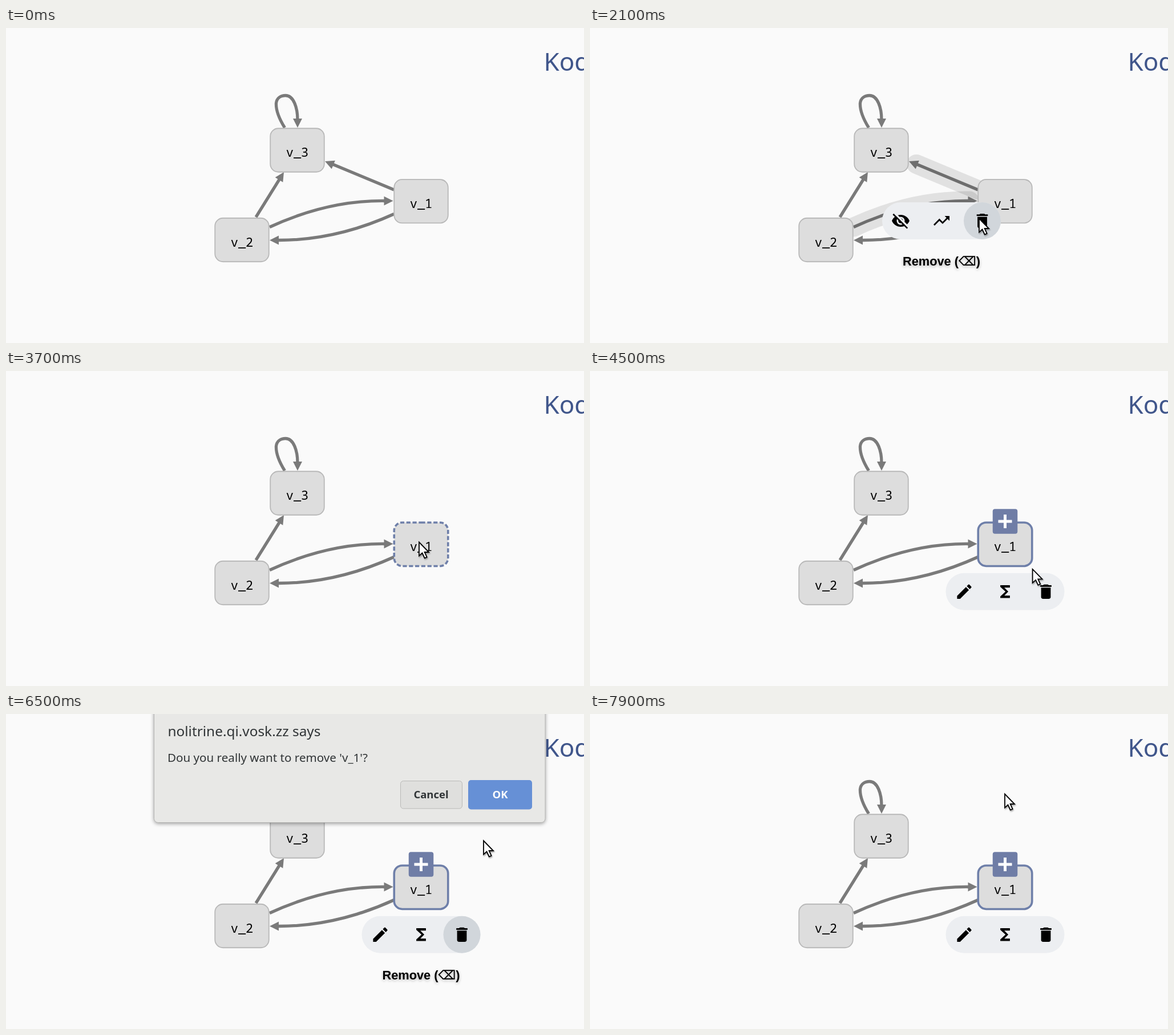
An HTML page that plays this animation: 1013x553 px, repeating every 8 s.

```html
<!DOCTYPE html>
<html lang="en">
<head>
<meta charset="utf-8">
<title>Graph editor</title>
<style>
  html, body { margin: 0; width: 100%; height: 100%; overflow: hidden; background: #fafafa; }
  svg { position: absolute; left: 0; top: 0; width: 1013px; height: 553px; overflow: hidden; }
  text { font-family: "Noto Sans", sans-serif; }
  .edge { fill: none; stroke: #7a7a7a; stroke-width: 5.3; }
  .head { fill: #7a7a7a; }
  .band { fill: none; stroke: #000; stroke-opacity: .1; stroke-width: 34; stroke-linecap: round; }
  .node path { fill: #ddd; stroke: #b8b8b8; stroke-width: 1.8; }
  .node text { font: 22px "Noto Sans Mono", monospace; text-anchor: middle; }
  #v_1.hover path { stroke: #6e7fa9; stroke-width: 3.6; stroke-dasharray: 7.2 3.6; }
  #v_1.selected path { stroke: #6e7fa9; stroke-width: 3.6; }
  .tip { font: bold 21.8px "Liberation Sans", "DejaVu Sans", sans-serif; text-anchor: middle;
         text-shadow: 0 2px 5px rgba(0, 0, 0, .3); }
  #dialog { transform-origin: 602px 0; }
  #dialog text { fill: #303436; }
  #dialog .label { font-size: 18.5px; font-weight: 600; text-anchor: middle; }
  #panel { filter: drop-shadow(0 2px 3px rgba(0, 0, 0, .35)); }
  #cursor { filter: drop-shadow(1px 2px 1px rgba(0, 0, 0, .35)); }
</style>
</head>
<body>
<svg id="graph">
  <text x="942.5" y="75" font-size="44" fill="#40568b">Kodra</text>
  <g id="edges"></g>
  <g id="nodes"></g>
  <g id="plus">
    <rect x="705.75" y="242.25" width="43.5" height="43.5" rx="4" fill="#6f7da6"/>
    <path d="M715.5 264h24M727.5 252v24" stroke="#fff" stroke-width="5"/>
  </g>
  <g id="menus"></g>
</svg>

<svg id="dialog">
  <g id="panel">
    <rect x="259.5" y="-40" width="685.5" height="230.5" rx="7" fill="#e8e8e6" stroke="#b4b4b2"/>
  </g>
  <text x="283.5" y="39" font-size="24.4">nolitrine.qi.vosk.zz says</text>
  <text x="283" y="83.5" font-size="20.6">Dou you really want to remove 'v_1'?</text>
  <rect x="691.5" y="117.5" width="108" height="48.5" rx="5" fill="#dfdfdd" stroke="#b9b9b7"/>
  <text class="label" x="745" y="148">Cancel</text>
  <rect id="ok" x="810" y="116" width="112" height="51.5" rx="5"/>
  <text class="label" x="866" y="148" style="fill:#fff">OK</text>
</svg>

<svg>
  <g id="cursor">
    <path d="M1 1.5V25.5L6.5 20.5L10.7 29.5L14.6 27.7L10.6 19H18Z" fill="#fff" stroke="#000" stroke-width="1.8"/>
  </g>
</svg>

<script>
const $ = id => document.getElementById(id);
const LOOP = 8000, STEP = 100;

// Edge line, then arrow tip and direction in degrees.
const edges = [
  ['loop', 'M488.5 175C478 158 473 143 473.5 132C474.5 123 481.5 118.5 490 118.5C504 118.5 511 140 511 161', 511, 175, 90],
  ['up', 'M438 332L479 266', 487, 253, -58],
  ['back', 'M680 326.5Q578 373 477 372.5', 462, 372.5, 180],
  ['removed', 'M680 284L572 239', 559, 234, 202.5],
  ['forth', 'M462 349.5Q565 302 665 303.5', 678.5, 303.5, 0]
];
$('edges').innerHTML = edges.map(([id, d, x, y, angle]) => `<g id="${id}">
  <path class="edge" d="${d}"/>
  <path class="head" d="M0 0L-16 -8V8Z" transform="translate(${x} ${y}) rotate(${angle})"/>
  <path class="band" id="${id}Band" d="${d}" visibility="hidden"/></g>`).join('');

// The outline starts at the top centre, so dashes run clockwise from there.
const outline = 'M0-38.25H33.25a14 14 0 0 1 14 14V24.25a14 14 0 0 1-14 14H-33.25' +
                'a14 14 0 0 1-14-14V-24.25a14 14 0 0 1 14-14Z';
const nodes = [['v_3', 510.5, 214.5], ['v_2', 413.5, 372], ['v_1', 727.5, 304.2]];
$('nodes').innerHTML = nodes.map(([name, x, y]) => `<g id="${name}" class="node" transform="translate(${x} ${y})">
  <path d="${outline}"/><text y="11.5">${name}</text></g>`).join('');

const icons = {
  hide: `<path d="M1 12c1.73-4.39 6-7.5 11-7.5s9.27 3.11 11 7.5c-1.73 4.39-6 7.5-11 7.5S2.73 16.39 1 12z"/>
    <circle cx="12" cy="12" r="5" fill="#eceef1"/><circle cx="12" cy="12" r="3"/>
    <path d="M3.5 1.8L21.3 19.6" stroke="#eceef1" stroke-width="2.6"/>
    <path d="M2.6 3.6L20.4 21.4" stroke="#000" stroke-width="1.8"/>`,
  trend: '<path d="M16 6l2.29 2.29-4.88 4.88-4-4L2 16.59 3.41 18l6-6 4 4 6.3-6.29L22 12V6z"/>',
  edit: `<path d="M3 17.25V21h3.75L17.81 9.94l-3.75-3.75zM20.71 7.04c.39-.39.39-1.02 0-1.41l-2.34-2.34
    c-.39-.39-1.02-.39-1.41 0l-1.83 1.83 3.75 3.75z"/>`,
  sum: '<path d="M18 4H6v2l6.5 6L6 18v2h12v-3h-7l5-5-5-5h7z"/>',
  trash: '<path d="M6 19c0 1.1.9 2 2 2h8c1.1 0 2-.9 2-2V7H6zM19 4h-3.5l-1-1h-5l-1 1H5v2h14z"/>'
};
const menu = (id, x, y, names) => `<g id="${id}" transform="translate(${x} ${y})">
  <rect x="-104" y="-32.5" width="208" height="65" rx="32.5" fill="#eceef1"/>
  <circle id="${id}Hover" cx="71.5" r="32.5" fill="#d1d6db"/>
  ${names.map((name, i) => `<g transform="translate(${(i - 1) * 71.5} 0) scale(1.4) translate(-12 -12)">${icons[name]}</g>`).join('')}
  <text id="${id}Tip" class="tip" y="78.5">Remove (⌫)</text></g>`;
$('menus').innerHTML = menu('edgeMenu', 616, 338.5, ['hide', 'trend', 'trash'])
                     + menu('nodeMenu', 727.5, 387.3, ['edit', 'sum', 'trash']);

// Pointer track: time, x, y.
const track = [
  [200, 770, 29], [700, 610, 245], [900, 611, 246], [1200, 611, 246], [1800, 688, 343],
  [1900, 688, 343], [2100, 681, 333], [3000, 681, 333], [3200, 756, 298], [3300, 756, 298],
  [3500, 723, 299], [4200, 723, 299], [4700, 809, 378], [4800, 809, 378], [5000, 804, 388],
  [6000, 804, 388], [6500, 836, 221], [6900, 868, 134], [7000, 868, 134], [7800, 726, 139]
];
const clamp = v => Math.max(0, Math.min(1, v));
const ramp = (t, from, to) => clamp((t - from) / (to - from));
const within = (t, from, to) => t >= from && t < to;
const show = (id, on) => $(id).setAttribute('visibility', on ? 'visible' : 'hidden');
const fade = (id, amount) => $(id).style.opacity = amount;

function pointer(t) {
  const next = track.findIndex(key => key[0] > t);
  if (next < 0) return track[track.length - 1].slice(1);
  if (next === 0) return track[0].slice(1);
  const [a, b] = [track[next - 1], track[next]];
  const k = ramp(t, a[0], b[0]);
  return [a[1] + (b[1] - a[1]) * k, a[2] + (b[2] - a[2]) * k];
}

function draw(t) {
  const [x, y] = pointer(t);
  $('cursor').setAttribute('transform', `translate(${x} ${y})`);
  show('cursor', t >= 200);

  show('removed', t < 2600);
  show('removedBand', within(t, 600, 2600));
  show('forthBand', within(t, 1500, 3100));

  $('v_1').setAttribute('class', 'node ' + (t >= 3800 ? 'selected' : t >= 3100 ? 'hover' : ''));
  show('plus', within(t, 3200, 3700) || t >= 3800);

  fade('edgeMenu', t < 2600 ? ramp(t, 1100, 1400) : 0);
  fade('nodeMenu', ramp(t, 3700, 4000));
  show('edgeMenuHover', t >= 1700);
  show('edgeMenuTip', t >= 1700);
  show('nodeMenuHover', within(t, 4600, 7400));
  show('nodeMenuTip', within(t, 4600, 7900));
  fade('nodeMenuTip', 1 - ramp(t, 7700, 7900));

  const open = t < 7000 ? [0, .2, .75, 1][Math.round(3 * ramp(t, 5400, 5700))] : 1 - ramp(t, 7000, 7300);
  const away = clamp((1 - open) / .8);
  fade('dialog', open);
  $('dialog').style.transform = `translateY(${-23 * away}px) perspective(2000px) rotateX(${-5 * away}deg)`;
  $('ok').setAttribute('fill', t >= 6800 ? '#739adb' : '#6690d6');
}

function frame(now) {
  draw(Math.floor(now % LOOP / STEP) * STEP);
  requestAnimationFrame(frame);
}
draw(0);
requestAnimationFrame(frame);
</script>
</body>
</html>
```
